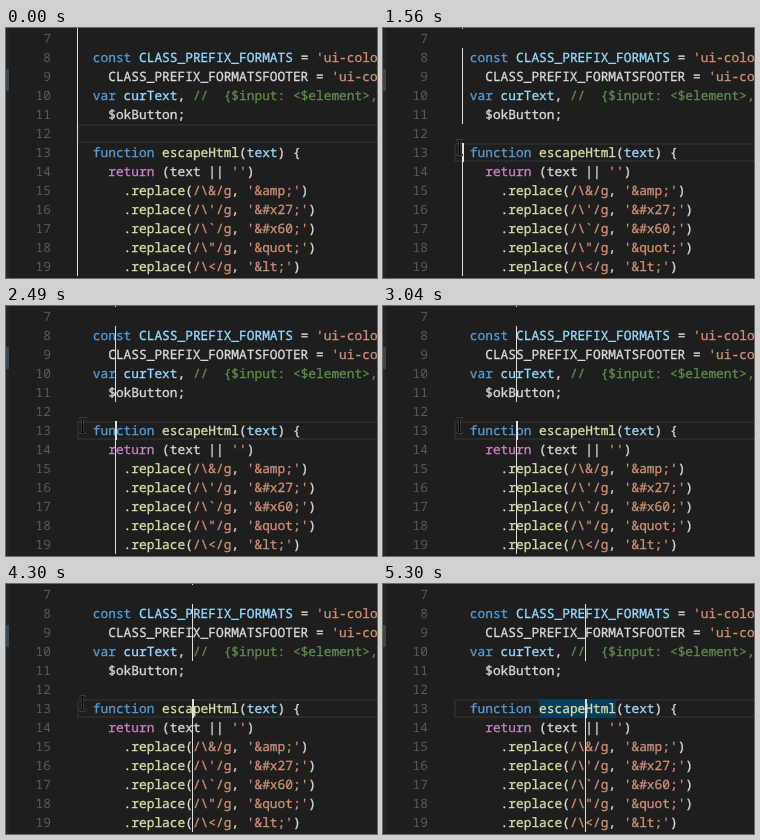
Animation of 371x250 px, one loop 6.23 s. Source, as an HTML page:

```html
<!DOCTYPE html>
<html lang="en">
<head>
<meta charset="utf-8">
<title>Cursor ruler</title>
<style>
  html, body { margin: 0; width: 100%; height: 100%; overflow: hidden; background: #1e1e1e; }
  svg { display: block; }
  text {
    font: 12.83px "Noto Sans Mono", "DejaVu Sans Mono", monospace;
    text-rendering: geometricPrecision;
    white-space: pre;
  }
  .code { stroke-width: .3px; }
</style>
</head>
<body>
<svg id="stage" width="371" height="250" viewBox="0 0 371 250">
  <rect width="371" height="250" fill="#1e1e1e"/>
  <rect width="3" height="250" fill="#252526"/>
  <rect y="41" width="3" height="22" fill="#3b464e"/>
  <rect id="activeLine" x="72" width="310" height="17" fill="none" stroke="#2a2a2a" stroke-width="2"/>
  <rect id="word" y="115" height="19" fill="#083d5a"/>
  <g id="code"></g>
  <path id="ruler" fill="none" stroke="#e0e0e0"/>
  <rect id="caret" y="115" width="2" height="19" fill="#e0e0e0"/>
  <g id="pointer" fill="none">
    <path d="M-3.5-7.5H-1L0-6.5L1-7.5H3.5M0-6.5V6.5M-3.5 7.5H-1L0 6.5L1 7.5H3.5" stroke="#626262" stroke-width="2"/>
    <path d="M-3.5-7.5H-1L0-6.5L1-7.5H3.5M0-6.5V6.5M-3.5 7.5H-1L0 6.5L1 7.5H3.5" stroke="#000" stroke-width="1.2"/>
  </g>
</svg>
<script>
const LOOP = 6230, LEFT = 71.43, CHAR = 7.697, ROW = 19;
const COLORS = {
  keyword: '#569cd6', control: '#c586c0', variable: '#9cdcfe', call: '#dcdcaa',
  string: '#ce9178', comment: '#608b4e', plain: '#dcdcdc', number: '#5a5a5a'
};
const $ = id => document.getElementById(id);
const columnX = column => LEFT + column * CHAR;
const caretX = column => Math.floor(columnX(column));
const rowY = line => 1 + (line - 7) * ROW;
const set = (id, attributes) => {
  for (const name in attributes) $(id).setAttribute(name, attributes[name]);
};
const show = (id, visible) => set(id, { visibility: visible ? 'visible' : 'hidden' });

function addText(x, line, content, color, anchor = 'start') {
  const node = document.createElementNS('http://www.w3.org/2000/svg', 'text');
  node.setAttribute('x', x);
  node.setAttribute('y', rowY(line) + 14);
  node.setAttribute('fill', COLORS[color]);
  node.setAttribute('text-anchor', anchor);
  if (color !== 'number') {
    node.setAttribute('class', 'code');
    node.setAttribute('stroke', COLORS[color]);
  }
  node.textContent = content;
  $('code').append(node);
}

// Each row: indent, then alternating color and text.
const replaceRow = (char, entity) => [6,
  'plain', '.', 'call', 'replace', 'plain', '(', 'string', `/\\${char}/g`,
  'plain', ', ', 'string', `'${entity}'`, 'plain', ')'];

const rows = {
  8: [2, 'keyword', 'const ', 'variable', 'CLASS_PREFIX_FORMATS', 'plain', ' = ', 'string', "'ui-color"],
  9: [4, 'plain', 'CLASS_PREFIX_FORMATSFOOTER = ', 'string', "'ui-color"],
  10: [2, 'keyword', 'var ', 'variable', 'curText', 'plain', ', ', 'comment', '//  {$input: <$element>,'],
  11: [4, 'plain', '$okButton;'],
  13: [2, 'keyword', 'function ', 'call', 'escapeHtml', 'plain', '(', 'variable', 'text', 'plain', ') {'],
  14: [4, 'control', 'return ', 'plain', '(text || ', 'string', "''", 'plain', ')'],
  15: replaceRow('&', '&amp;'),
  16: replaceRow("'", '&#x27;'),
  17: replaceRow('`', '&#x60;'),
  18: replaceRow('"', '&quot;'),
  19: replaceRow('<', '&lt;')
};

// The row above the first visible one shows only its last pixel.
const rowLengths = { 6: 16 };
for (let line = 7; line <= 19; line++) {
  addText(45, line, line, 'number', 'end');
  let [column, ...tokens] = rows[line] || [0];
  for (let i = 0; i < tokens.length; i += 2) {
    addText(columnX(column), line, tokens[i + 1], tokens[i]);
    column += tokens[i + 1].length;
  }
  rowLengths[line] = column;
}
set('word', { x: columnX(11), width: 10 * CHAR });

const caretMoves = [1560, 1860, 2090, 2260, 2410, 2640, 2870, 3040, 3190,
  3340, 3590, 3740, 3890, 4060, 4300, 4450, 4680];
// The ruler trails the caret on some key presses.
const rulerMoves = caretMoves.map(time => time + ({ 1860: 80, 2410: 80, 3340: 90, 4450: 80 }[time] || 0));
const columnAt = (moves, time) => moves.filter(move => move <= time).length;

// The ruler crosses only the rows that reach its column.
function rulerPath(column) {
  const x = caretX(column) + 0.5;
  return Object.keys(rowLengths)
    .filter(line => rowLengths[line] >= column)
    .map(line => `M${x} ${rowY(line)}v${ROW}`).join('');
}

// Time, x, y
const pointerPath = [[80, 87, 121], [150, 78.5, 120], [320, 76.5, 119.5],
  [5140, 160, 127], [5220, 239, 137]];

function draw(time) {
  set('activeLine', { y: rowY(time < 390 ? 12 : 13) + 1 });
  show('word', time >= 4910);

  set('ruler', { d: rulerPath(columnAt(rulerMoves, time)) });
  set('caret', { x: caretX(columnAt(caretMoves, time)) });
  show('caret', time >= 1560 || (time >= 390 && time < 880));

  const spot = pointerPath.filter(([start]) => start <= time).pop();
  show('pointer', spot && time < 5300);
  if (spot) set('pointer', { transform: `translate(${spot[1]} ${spot[2]})` });
}

const start = performance.now();
function tick() {
  draw((performance.now() - start) % LOOP);
  requestAnimationFrame(tick);
}
tick();
</script>
</body>
</html>
```
